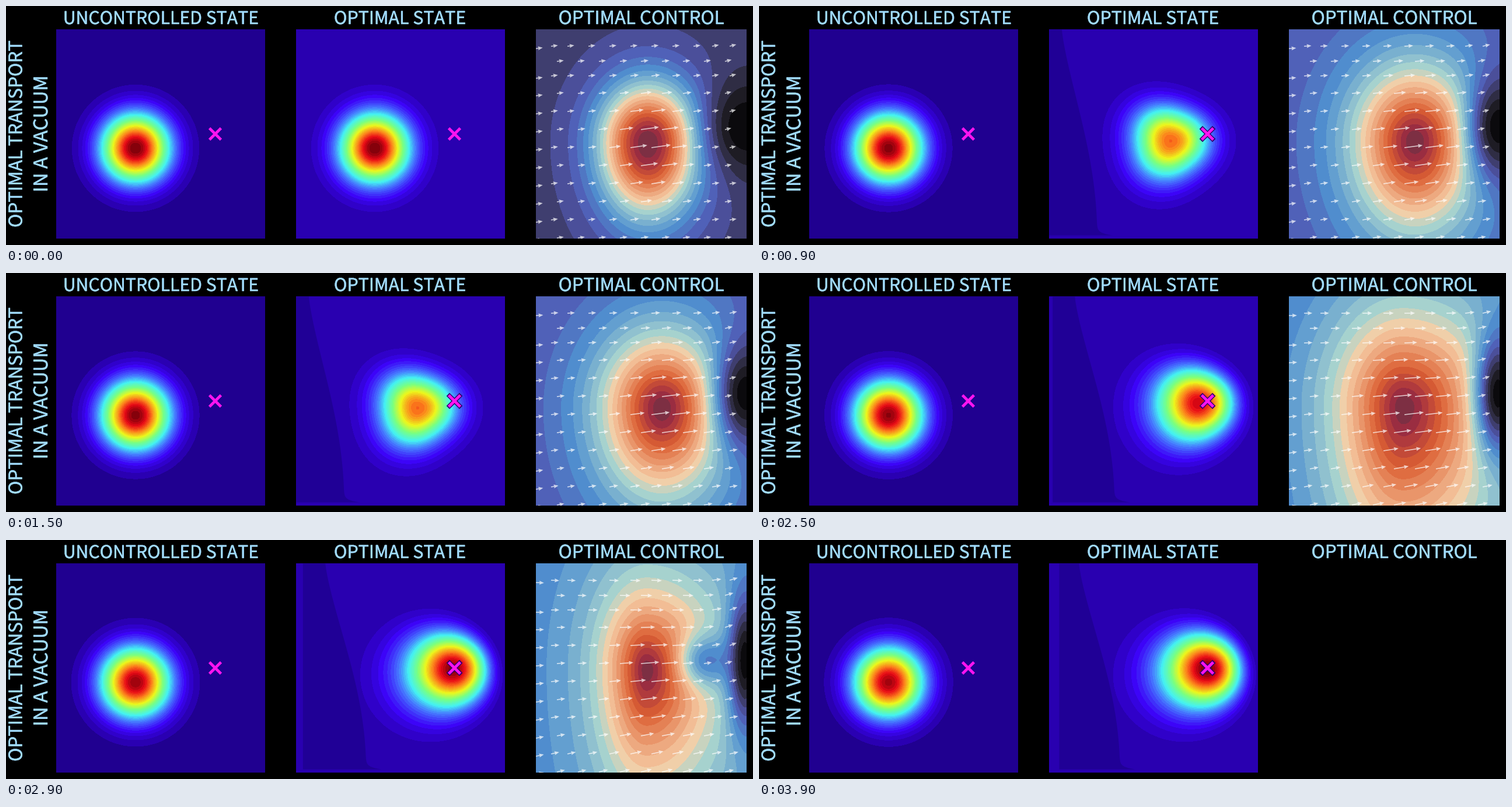
A matplotlib script for the animation above (4000 ms loop, 1280x410 px).

```python
import numpy as np
import matplotlib.pyplot as plt
from matplotlib import patheffects
from matplotlib.animation import FuncAnimation
from matplotlib.colors import LinearSegmentedColormap

W, H, DPI = 1280, 410, 80
TOP, BOTTOM = 40, 399
PT = 72 / DPI                # points per pixel
TICKS, STEPS = 40, 5         # ticks of 100 ms, simulation steps shown


def rgb(*c):
    return tuple(v / 255 for v in c)


def make_cmap(name, stops):
    return LinearSegmentedColormap.from_list(
        name, [(t, rgb(*c)) for t, c in stops], N=512)


HEAT = make_cmap("heat", [
    (0, (28, 0, 128)), (.035, (41, 0, 176)), (.11, (60, 4, 248)),
    (.25, (70, 130, 255)), (.36, (68, 242, 242)), (.5, (120, 255, 130)),
    (.64, (236, 248, 28)), (.78, (252, 128, 28)), (.9, (232, 8, 22)),
    (1, (120, 0, 10))])
FORCE = make_cmap("force", [
    (0, (2, 2, 2)), (.085, (40, 37, 48)), (.17, (72, 72, 138)),
    (.22, (80, 92, 182)), (.32, (80, 145, 208)), (.49, (172, 214, 206)),
    (.57, (246, 206, 166)), (.8, (220, 95, 50)), (.93, (160, 45, 65)),
    (1, (112, 48, 68))])
LABEL = rgb(160, 218, 250)
MAGENTA = rgb(255, 20, 240)
OUTLINE = rgb(45, 0, 110)
SHADE = rgb(32, 0, 150)

fig = plt.figure(figsize=(W / DPI, H / DPI), dpi=DPI, facecolor="black")


def panel(x0, x1):
    """Axes whose data units are stage pixels, y pointing down."""
    ax = fig.add_axes([x0 / W, 1 - BOTTOM / H, (x1 - x0) / W, (BOTTOM - TOP) / H])
    ax.set_xlim(x0, x1)
    ax.set_ylim(BOTTOM, TOP)
    ax.axis("off")
    grid = np.meshgrid(np.linspace(x0, x1, 181), np.linspace(TOP, BOTTOM, 181))
    return ax, grid


def gauss(grid, cx, cy, sx, sy):
    return np.exp(-((grid[0] - cx) / sx) ** 2 / 2 - ((grid[1] - cy) / sy) ** 2 / 2)


def cross(ax, x, y, outlined):
    arts = []
    layers = [(11.2, 7.6, OUTLINE)] if outlined else []
    for half, width, color in layers + [(9.9, 4.8, MAGENTA)]:
        for s in (1, -1):
            arts += ax.plot([x - half, x + half], [y - s * half, y + s * half],
                            color=color, lw=width * PT, zorder=4,
                            solid_capstyle="butt")
    return arts


# Uncontrolled state: a bump that spreads slowly in place

def free_state(ax, grid, k):
    s = 40 * (1 + .005 * k)
    v = (1 - .01 * k) * gauss(grid, 222, 244, s, s)
    return [ax.contourf(*grid, v, levels=np.linspace(0, 1, 41), cmap=HEAT)]


# Optimal state: the bump travels to the cross, its tail lags behind

def remaining(k):
    """Share of the way to the cross that is still ahead."""
    return .46 ** k ** 1.5


def bump(grid, rest):
    done = 1 - rest
    mid = rest * done
    cx, cy = 768 - 136 * rest, 221 + 23 * rest
    lag_x, lag_y = -36 * done ** 2.5, 10 * done
    stretch, sigma = 1 + .07 * done ** .5, 40 * (1 + .05 * done)
    r = 0
    # Nested rings: the wider the ring, the further its center lags
    for _ in range(25):
        lag = np.minimum((r / 110) ** 2, 1.2) if np.ndim(r) else 0
        dx = (grid[0] - cx - lag_x * lag) / stretch
        dy = grid[1] - cy - lag_y * lag
        corner = np.cos(3 * (np.arctan2(dy, dx) + .15))
        r = np.hypot(dx, dy) / (1 + .2 * mid * corner)
    return (1 - .8 * mid) * np.exp(-(r / sigma) ** 2 / 2)


def wake(ax, k, rest):
    """Slightly darker area the bump has left."""
    y = np.linspace(TOP, 393, 150)
    u = (y - TOP) / 353
    edge = 548 - 64 * rest + 70 * (1 - .3 * rest) * np.sin(u * np.pi / 2) ** 1.3
    return ax.fill_betweenx(y, 497 + 17 * (k - 1) / 3, edge + 26 * u ** 90,
                            color=SHADE, lw=0, zorder=2)


def best_state(ax, grid, k):
    rest = remaining(k)
    arts = [ax.contourf(*grid, bump(grid, rest),
                        levels=np.linspace(-.025, 1, 42), cmap=HEAT)]
    if k:
        arts.append(wake(ax, k, rest))
    return arts + cross(ax, 768.5, 219.5, k > 0)


# Optimal control: center of the hill and its reach (left, right, up, down)
HILLS = [
    ((1100, 235), (70, 72, 85, 105)),
    ((1124, 232), (91, 92, 110, 130)),
    ((1104, 230), (106, 145, 148, 225)),
    ((1098, 222), (74, 112, 135, 185)),
]


def force_field(grid, k):
    (cx, cy), (left, right, up, down) = HILLS[k]
    dx, dy = grid[0] - cx, grid[1] - cy
    r = np.hypot(dx / np.where(dx < 0, left, right), dy / np.where(dy < 0, up, down))
    base, power = .15 + .05 * k, 1.25 + .65 * .4 ** k
    steep = np.log((1 - base) / (.55 - base))     # value .55 at full reach
    v = base + (1 - base) * np.exp(-steep * r ** power)
    v = v * (1 - .97 * gauss(grid, 1266, 207, 46 * .76 ** k, 58 + 8 * k))
    dent = .5 * (k / 3) ** 8
    return np.clip(v * (1 - dent * gauss(grid, 1198, 207, 32, 32)), .001, .999)


def arrow_tails():
    rows = np.r_[68, 94, 119, np.arange(149, 400, 31)]
    even = np.r_[934, np.arange(962, 1180, 36), 1210, 1240]
    odd = np.arange(944, 1240, 36)
    tails = [(x, y + 1) for i, y in enumerate(rows)
             for x in (odd if i % 2 else even)]
    tails += [(908, y + 5) for y in rows if y != 94]
    return np.array(tails, float).T


TAILS = arrow_tails()


def control(ax, grid, k):
    if k >= len(HILLS):
        return []
    fill = ax.contourf(*grid, force_field(grid, k),
                       levels=np.linspace(0, 1, 25), cmap=FORCE)
    x, y = TAILS
    length = 11 + 23 * force_field(TAILS, k) ** 1.8
    side = np.exp(-((x - 1250) / 45) ** 2) / (1 + np.exp((y - 240) / 25))
    angle = np.radians(8 - k + (1 + 2.7 * k) * (y - 220) / 180
                       + (8 + 1.4 * k * k) * side)
    arrows = ax.quiver(x, y, length * np.cos(angle), -length * np.sin(angle),
                       angles="xy", scale_units="xy", scale=1, units="xy",
                       width=1.6, headwidth=4.2, headlength=5,
                       headaxislength=4.5, color="white", alpha=.72, zorder=3)
    return [fill, arrows]


# Static labels
FONT = dict(family="Noto Sans CJK JP", color=LABEL, ha="center", va="baseline",
            rotation_mode="anchor",
            path_effects=[patheffects.withStroke(linewidth=.4, foreground=LABEL)])


def label(text, x, y, size, rotation=0):
    fig.text(x / W, 1 - y / H, text, fontsize=size * PT, rotation=rotation, **FONT)


label("UNCONTROLLED STATE", 265, 31, 30.2)
label("OPTIMAL STATE", 675.5, 31, 30.4)
label("OPTIMAL CONTROL", 1088.5, 31, 31.3)
label("OPTIMAL TRANSPORT", 27.5, 219.5, 31.4, 90)
label("IN A VACUUM", 71, 219.5, 32.6, 90)

first = panel(86, 444)
second = panel(497, 855)
third = panel(908, 1269)
scenes = [free_state(*first, k) + best_state(*second, k) + control(*third, k)
          for k in range(STEPS)]
cross(first[0], 358.5, 219.5, False)


def draw(tick):
    step = (tick + 1) // 10      # the picture jumps one tick before each second
    for k, arts in enumerate(scenes):
        for art in arts:
            art.set_visible(k == step)
    return []


anim = FuncAnimation(fig, draw, frames=TICKS, interval=100, init_func=lambda: draw(0),
                     repeat=True, repeat_delay=0, blit=False)
plt.show()
```
